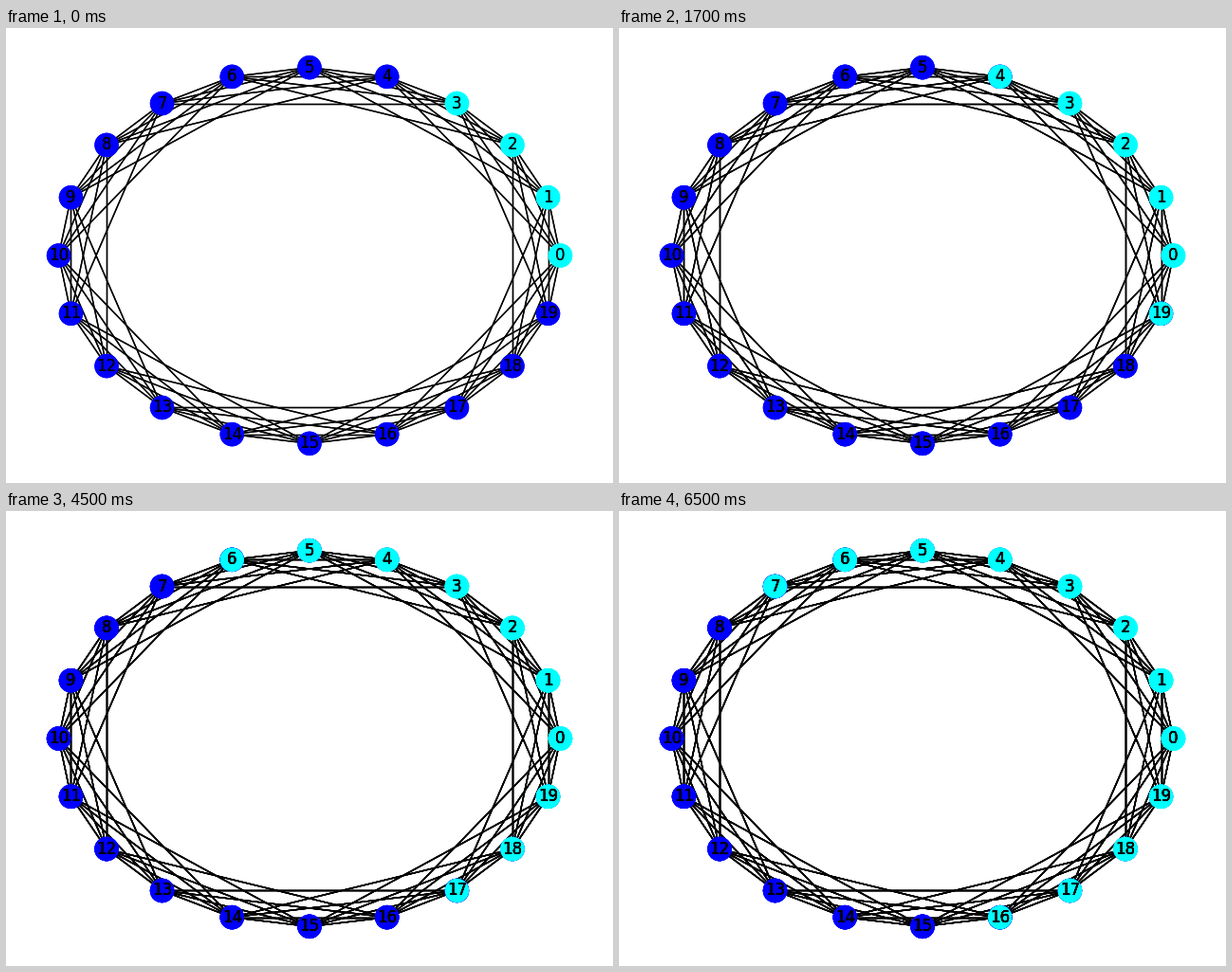
Write a matplotlib script that moves like this. It is 640 px wide and 480 px high and loops after 8000 ms.

```python
import numpy as np
import matplotlib.pyplot as plt
from matplotlib.animation import FuncAnimation
from matplotlib.collections import LineCollection

NODES = 20
REACH = 4          # each node links to this many neighbours per side
SEEDS = 4          # nodes active at the start
STEPS = 5
FIRST_LAYERS = 2   # the opening state is painted twice

plt.rcParams["font.family"] = "DejaVu Sans"
fig = plt.figure(figsize=(6.4, 4.8), dpi=100, facecolor="white")
ax = fig.add_axes([0, 0, 1, 1])
ax.set_axis_off()
ax.set(xlim=(-1.21, 1.21), ylim=(-1.21, 1.21))

angles = 2 * np.pi * np.arange(NODES) / NODES
points = np.column_stack([np.cos(angles), np.sin(angles)])
edges = [(points[n], points[(n + d) % NODES])
         for n in range(NODES) for d in range(1, REACH + 1)]


def node_colors(step):
    """The active arc grows by one node at both ends per step."""
    active = {n % NODES for n in range(-step, SEEDS + step)}
    return ["cyan" if n in active else "blue" for n in range(NODES)]


def paint_layer(step):
    lines = LineCollection(edges, colors="black", linewidths=1, zorder=1)
    ax.add_collection(lines, autolim=False)
    dots = ax.scatter(*points.T, s=300, c=node_colors(step), zorder=2)
    labels = [ax.text(x, y, str(n), size=12, ha="center", va="center", zorder=3)
              for n, (x, y) in enumerate(points)]
    return [lines, dots, *labels]


# Every step is painted over the earlier ones, so edges and text grow heavier.
layers = [(step, paint_layer(step))
          for step in [0] * (FIRST_LAYERS - 1) + list(range(STEPS))]


def update(frame):
    current = (frame + 3) // 4
    for step, artists in layers:
        for artist in artists:
            artist.set_visible(step <= current)
    return []


anim = FuncAnimation(fig, update, frames=16, interval=500,
                     repeat=True, repeat_delay=0, blit=False)
plt.show()
```
